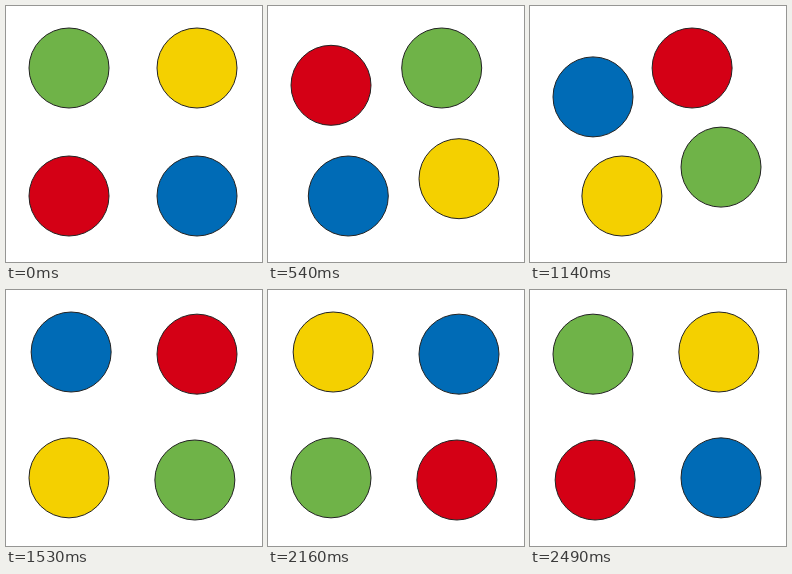
Animation, 256 px wide and 256 px high, one loop 2520 ms. Source, as an HTML page with a canvas:

```html
<!DOCTYPE html>
<html>
<head>
<meta charset="utf-8">
<style>
html, body { margin: 0; width: 100%; height: 100%; overflow: hidden; background: #fff; }
canvas { display: block; }
</style>
</head>
<body>
<canvas id="stage" width="256" height="256"></canvas>
<script>
const ctx = document.getElementById('stage').getContext('2d');
const colors = ['#6fb348', '#f4d000', '#006bb6', '#d40015'];
const corners = [[63, 62], [191, 62], [191, 190], [63, 190]];
const TICK = 30, TURN = 21, REST = 8, MOVE = 13;

const smooth = t => t * t * (3 - 2 * t);

function draw(ms) {
  const tick = Math.floor(ms / TICK) % (TURN * 4);
  const turn = Math.floor(tick / TURN);
  const p = smooth(Math.max(0, tick % TURN - REST) / MOVE);
  ctx.fillStyle = '#fff';
  ctx.fillRect(0, 0, 256, 256);
  ctx.lineWidth = 1;
  ctx.strokeStyle = '#222';
  colors.forEach((color, i) => {
    const [x0, y0] = corners[(i + turn) % 4];
    const [x1, y1] = corners[(i + turn + 1) % 4];
    ctx.beginPath();
    ctx.arc(x0 + (x1 - x0) * p, y0 + (y1 - y0) * p, 40, 0, Math.PI * 2);
    ctx.fillStyle = color;
    ctx.fill();
    ctx.stroke();
  });
}

const start = performance.now();
function loop() {
  draw(performance.now() - start);
  requestAnimationFrame(loop);
}
loop();
</script>
</body>
</html>
```
